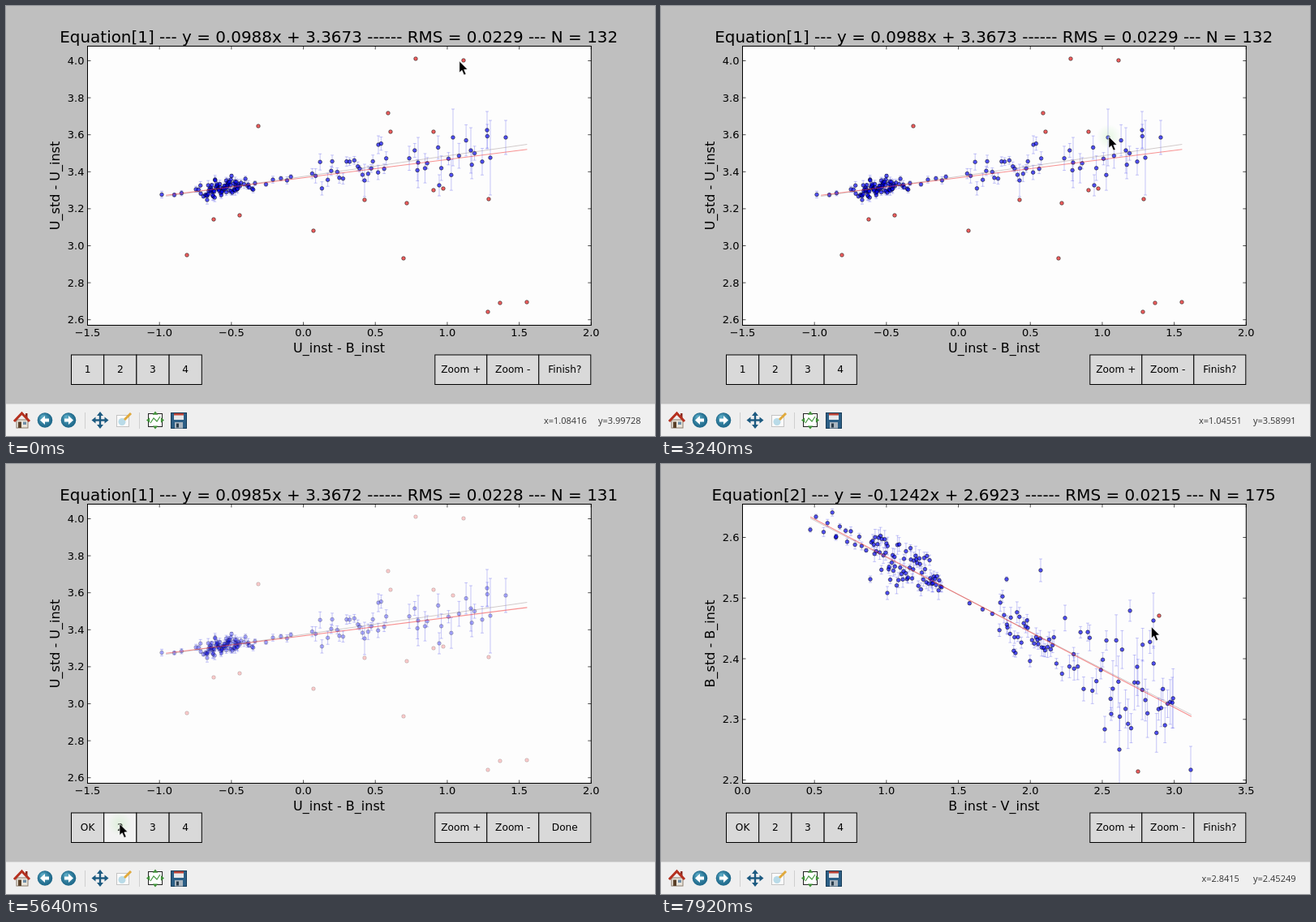
Recreate the animation shown at these times as an HTML page with a canvas. Size 800 by 530 pixels, loop 8000 ms.

```html
<!DOCTYPE html>
<html>
<head>
<meta charset="utf-8">
<style>
html, body { margin: 0; width: 100%; height: 100%; overflow: hidden; background: #bfbfbf; }
canvas { display: block; }
</style>
</head>
<body>
<canvas id="stage" width="800" height="530"></canvas>
<script>
const ctx = document.getElementById('stage').getContext('2d');
const LOOP = 8000, STEP = 120;
const SANS = '"DejaVu Sans", sans-serif';
const AXES = { left: 100.5, top: 49.5, right: 721.3, bottom: 393.5 };
const X_SCALE = (AXES.right - AXES.left) / 3.5;

let seed = 11;
const random = () => (seed = (seed * 16807) % 2147483647) / 2147483647;
// Sum of uniform numbers: a bell curve without far outliers.
const bell = () => (random() + random() + random() - 1.5) * 2;

const toStage = (plot, x, y) => [
  AXES.left + (x - plot.x0) * X_SCALE,
  plot.base.px + (plot.base.value - y) * plot.base.scale
];

// Measurements spread evenly along x and scattered around the guide line.
function scatter(plot, { count, from, to, offset = 0, spread, bar }) {
  const [x0, x1] = plot.ends.map(x => toStage(plot, x, 0)[0]);
  const [y0, y1] = plot.guide;
  return Array.from({ length: count }, (_, i) => {
    const x = from + (to - from) * (i + random()) / count;
    const y = y0 + (y1 - y0) * (x - x0) / (x1 - x0) + offset + bell() * spread;
    return [x, y, bar * (0.5 + random())];
  });
}

// Points are [x, y, error bar half height] in stage pixels of the plot's base view.
const colourU = {
  eq: 1, names: ['U_inst - B_inst', 'U_std - U_inst'],
  x0: -1.5, yStep: 0.2, ends: [-0.955, 1.555], guide: [234.5, 170.5],
  base: { value: 4, px: 67.5, scale: 228 },
  good: [[593, 153, 23], [616, 162, 21], [597, 187, 46], [508, 193, 31], [573, 178, 28],
    [459, 171, 11], [442, 215, 20], [534, 221, 13]],
  bad: [
    [505, 65], [311, 148], [471, 132], [474, 155], [527, 155], [442, 239], [494, 243], [527, 227],
    [539, 225], [595, 238], [490, 311], [379, 277], [256, 263], [288, 258], [223, 307], [594, 377],
    [609, 366], [642, 365]
  ]
};
colourU.good.push(...[
  { count: 4, from: 192, to: 236, spread: 2, bar: 3 },
  { count: 34, from: 236, to: 306, spread: 5, bar: 4 },
  { count: 44, from: 247, to: 287, offset: -1, spread: 5, bar: 4 },
  { count: 6, from: 306, to: 360, spread: 1.5, bar: 3 },
  { count: 23, from: 376, to: 472, offset: -2, spread: 12, bar: 7 },
  { count: 15, from: 490, to: 598, spread: 13, bar: 13 }
].flatMap(group => scatter(colourU, group)));
const topPoint = [564, 67, 43], nearPoint = [551, 162, 35];

const colourB = {
  eq: 2, names: ['B_inst - V_inst', 'B_std - B_inst'],
  x0: 0, yStep: 0.1, ends: [0.471, 3.12], guide: [67, 309],
  base: { value: 2.6, px: 90.5, scale: 747.5 },
  good: [[184, 81, 3], [191, 65, 3], [258, 142, 4], [279, 159, 8], [426, 142, 3], [437, 233, 5],
    [468, 131, 14], [607, 193, 34], [565, 352, 43], [547, 327, 16], [653, 377, 29]],
  bad: [[614, 187], [588, 379], [610, 409], [223, 570]]
};
const wideB = { value: 2.6, px: 81, scale: 461.7 };
colourB.good.push(...[
  { count: 14, from: 198, to: 260, offset: -2, spread: 9, bar: 4 },
  { count: 70, from: 260, to: 346, offset: -1, spread: 13, bar: 8 },
  { count: 3, from: 375, to: 415, offset: 4, spread: 2, bar: 3 },
  { count: 34, from: 416, to: 488, offset: 4, spread: 13, bar: 9 },
  { count: 17, from: 494, to: 558, offset: 6, spread: 26, bar: 11 },
  { count: 27, from: 556, to: 634, offset: 12, spread: 46, bar: 25 }
].flatMap(group => scatter(colourB, group)));

const FIT_132 = ['0.0988x + 3.3673', '0.0229', 132];
const FIT_133 = ['0.1022x + 3.3689', '0.0250', 133];
const FIT_131 = ['0.0985x + 3.3672', '0.0228', 131];
const FIT_B = ['-0.1242x + 2.6923', '0.0215', 175];

const CLICKS = [840, 1560, 3240, 4320, 5640, 6600];
// Each move is [start, end, x, y]; the pointer rests in between.
const MOVES = [
  [0, 0, ...toStage(colourU, 1.08416, 3.99728)],
  [120, 360, ...toStage(colourU, 1.10434, 4.00118)],
  [1920, 2400, ...toStage(colourU, 1.06902, 3.66579)],
  [2400, 2880, 552, 161],
  [3480, 3960, 659, 456.5],
  [3960, 4200, 688, 450],
  [4800, 5400, 140, 443.5],
  [6000, 6480, 568, 444.5],
  [6960, 7800, ...toStage(colourB, 2.8415, 2.45249)]
];

function cursorAt(t) {
  let [, , x, y] = MOVES[0];
  for (const [start, end, toX, toY] of MOVES.slice(1)) {
    const p = Math.max(0, Math.min(1, (t - start) / (end - start)));
    const ease = p * p * (3 - 2 * p);
    x = x * (1 - ease) + toX * ease;
    y = y * (1 - ease) + toY * ease;
  }
  return [x, y];
}

function stateAt(t) {
  if (t >= 5880) {
    return { plot: colourB, view: t < 6840 ? wideB : colourB.base, fit: FIT_B,
      good: colourB.good, bad: colourB.bad };
  }
  const added = t >= 960 && t < 1800, dropped = t >= 3360;
  return {
    plot: colourU, view: colourU.base, done: t >= 4440,
    fit: added ? FIT_133 : dropped ? FIT_131 : FIT_132,
    good: colourU.good.concat(added ? [topPoint] : [], dropped ? [] : [nearPoint]),
    bad: colourU.bad.concat(added ? [] : [topPoint], dropped ? [nearPoint] : [])
  };
}

function line(points, colour, width = 1) {
  ctx.beginPath();
  points.forEach(([x, y]) => ctx.lineTo(x, y));
  ctx.strokeStyle = colour;
  ctx.lineWidth = width;
  ctx.stroke();
}

function shape(points, fill) {
  ctx.beginPath();
  points.forEach(([x, y]) => ctx.lineTo(x, y));
  ctx.closePath();
  ctx.fillStyle = fill;
  ctx.fill();
}

function rect(x, y, w, h, fill, stroke) {
  ctx.fillStyle = fill;
  ctx.fillRect(x, y, w, h);
  if (!stroke) return;
  ctx.strokeStyle = stroke;
  ctx.lineWidth = 1;
  ctx.strokeRect(x, y, w, h);
}

function disc(x, y, radius, fill) {
  ctx.beginPath();
  ctx.arc(x, y, radius, 0, 7);
  ctx.fillStyle = fill;
  ctx.fill();
}

function text(string, x, y, size, align = 'center', family = SANS, colour = '#000') {
  ctx.font = `${size}px ${family}`;
  ctx.textAlign = align;
  ctx.fillStyle = colour;
  ctx.fillText(string, x, y);
}

function dot(x, y, colour, alpha) {
  ctx.globalAlpha = alpha;
  disc(x, y, 2.3, colour);
  ctx.strokeStyle = '#000';
  ctx.lineWidth = 0.8;
  ctx.stroke();
  ctx.globalAlpha = 1;
}

function drawData({ plot, view, fit, good, bad, done }) {
  const mapY = y => view.px + (y - plot.base.px) * view.scale / plot.base.scale;
  const [slope, offset] = fit[0].split('x + ').map(Number);
  const ends = plot.ends.map(x => toStage(plot, x, slope * x + offset));
  ctx.save();
  ctx.beginPath();
  ctx.rect(AXES.left, AXES.top, AXES.right - AXES.left, AXES.bottom - AXES.top);
  ctx.clip();
  for (const [x, y, error] of good) {
    const low = mapY(y + error), high = mapY(y - error), colour = 'rgba(0,0,225,.22)';
    line([[x, low], [x, high]], colour);
    line([[x - 2, low], [x + 2, low]], colour);
    line([[x - 2, high], [x + 2, high]], colour);
  }
  bad.forEach(([x, y]) => dot(x, mapY(y), '#e80000', done ? 0.2 : 0.62));
  good.forEach(([x, y]) => dot(x, mapY(y), '#00f', done ? 0.3 : 0.65));
  line(ends.map(([x], i) => [x, mapY(plot.guide[i])]), 'rgba(128,110,110,.35)');
  line(ends.map(([x, y]) => [x, mapY(y)]), 'rgba(240,30,30,.48)', 1.2);
  ctx.restore();
}

function drawAxes({ plot, view, fit }) {
  const { left, top, right, bottom } = AXES;
  const label = v => v.toFixed(1).replace('-', '\u2212');
  ctx.strokeStyle = '#000';
  ctx.lineWidth = 1;
  ctx.strokeRect(left, top, right - left, bottom - top);
  for (let i = 0; i <= 7; i++) {
    const x = left + i * X_SCALE / 2;
    line([[x, bottom], [x, bottom - 4]], '#000', 0.7);
    line([[x, top], [x, top + 4]], '#000', 0.7);
    text(label(plot.x0 + i / 2), x, 407, 13);
  }
  for (let value = view.value; ; value -= plot.yStep) {
    const y = view.px + (view.value - value) * view.scale;
    if (y > bottom) break;
    line([[left, y], [left + 4, y]], '#000', 0.7);
    line([[right, y], [right - 4, y]], '#000', 0.7);
    text(label(value), 96.5, y + 4.5, 13, 'right');
  }
  text(`Equation[${plot.eq}] --- y = ${fit[0]} ------ RMS = ${fit[1]} --- N = ${fit[2]}`, 410.2, 45, 19.95);
  text(plot.names[0], 410.5, 427, 16);
  ctx.save();
  ctx.translate(66, 221.5);
  ctx.rotate(-Math.PI / 2);
  text(plot.names[1], 0, 0, 16);
  ctx.restore();
}

function drawButtons(t, done) {
  const [mx, my] = cursorAt(Math.max(0, t - STEP));
  const row = (left, width, labels) => labels.forEach((label, i) => {
    const x = left + i * width;
    const hover = mx > x && mx < x + width && my > 430 && my < 466;
    rect(x, 430, width, 36.5, hover ? '#f2f2f2' : '#d9d9d9', '#000');
    text(label, x + width / 2, 451.5, 12.2);
  });
  row(80.5, 40.2, [t >= 4920 ? 'OK' : '1', '2', '3', '4']);
  row(528.8, 64, ['Zoom +', 'Zoom -', done ? 'Done' : 'Finish?']);
}

function roundArrow(x, direction) {
  const ball = ctx.createRadialGradient(x - 3, 506, 1, x, 511, 10);
  ball.addColorStop(0, '#5aa9c4');
  ball.addColorStop(1, '#155f82');
  disc(x, 510.5, 9.3, ball);
  const tip = x + direction * 6;
  shape([[tip, 510.5], [x, 505], [x, 516]], '#fff');
  line([[x, 510.5], [x - direction * 5, 510.5]], '#fff', 4);
}

function fourArrows(x, y, radius, size, colour) {
  for (let i = 0; i < 4; i++) {
    ctx.save();
    ctx.translate(x, y);
    ctx.rotate(i * Math.PI / 2);
    shape([[0, -radius], [-size, size * 1.25 - radius], [size, size * 1.25 - radius]], colour);
    ctx.restore();
  }
}

function drawToolbar({ plot, view }, x, y) {
  rect(0, 490.5, 800, 40, '#efefef');
  for (const divider of [97.5, 164.5]) line([[divider, 501], [divider, 521]], '#cfcfcf');

  rect(13, 510, 14, 10, '#e9e4da', '#8a7a6a');
  rect(24, 502, 2.5, 6, '#8b2a1c');
  line([[10, 512], [19.5, 502], [29, 512]], '#b5301f', 3);
  rect(15, 512.5, 4, 7.5, '#5a4028');
  rect(21, 512.5, 4, 3.5, '#6f8fa8');

  roundArrow(48, -1);
  roundArrow(77, 1);

  line([[108, 510.5], [124, 510.5]], '#1c5a80', 2.4);
  line([[116, 502], [116, 519]], '#1c5a80', 2.4);
  fourArrows(116, 510.5, 10.5, 4, '#1c5a80');

  rect(136.5, 504.5, 15, 14, '#fafafa', '#c4c4c4');
  disc(143, 512.5, 4.5, '#b9dbe8');
  line([[146, 510], [154, 502]], '#e0a93c', 3);

  rect(175.5, 502.5, 17, 16, '#fff', '#222');
  line([[178, 514], [182, 508], [186, 512], [190, 506]], '#4a9a45', 1.2);
  fourArrows(184, 510.5, 11, 3.3, '#3f9138');

  rect(203.5, 501.5, 19, 19, '#2c5f86', '#173c58');
  rect(207, 502, 12, 8, '#e6e9ec');
  rect(207, 502, 12, 2.5, '#b94134');
  rect(208, 513, 10, 7.5, '#aab6c0');
  rect(210, 514.5, 3, 5, '#2a3d4c');

  const { left, top, right, bottom } = AXES;
  if (x < left || x > right || y < top || y > bottom) return;
  const show = v => Number(v.toPrecision(6));
  const dataX = show(plot.x0 + (x - left) / X_SCALE);
  const dataY = show(view.value - (y - view.px) / view.scale);
  text(`x=${dataX}`.padEnd(14) + `y=${dataY}`, 782.5, 514.5, 11, 'right', '"Open Sans", "Noto Sans", sans-serif', '#333');
}

function drawCursor(t, x, y) {
  const click = CLICKS.find(c => t >= c && t < c + 660);
  if (click !== undefined) {
    const glow = ctx.createRadialGradient(x, y, 4, x, y, 15);
    glow.addColorStop(0, '#a6e69a');
    glow.addColorStop(1, 'rgba(166,230,154,0)');
    ctx.globalAlpha = 0.75 * Math.sin(Math.PI * (t - click + 60) / 720);
    disc(x, y, 15, glow);
    ctx.globalAlpha = 1;
  }
  ctx.save();
  ctx.translate(x, y);
  shape([[0, 0], [0, 14], [3.2, 11.2], [5.7, 17], [8.2, 16], [5.8, 10.4], [10, 10]], '#000');
  ctx.strokeStyle = 'rgba(255,255,255,.8)';
  ctx.lineWidth = 0.8;
  ctx.stroke();
  ctx.restore();
}

function draw(now) {
  const t = Math.floor((now % LOOP) / STEP) * STEP;
  const state = stateAt(t), [x, y] = cursorAt(t);
  rect(0, 0, 800, 530, '#bfbfbf');
  rect(AXES.left, AXES.top, AXES.right - AXES.left, AXES.bottom - AXES.top, '#fdfdfd');
  drawData(state);
  drawAxes(state);
  drawButtons(t, state.done);
  drawToolbar(state, x, y);
  drawCursor(t, x, y);
  requestAnimationFrame(draw);
}
requestAnimationFrame(draw);
</script>
</body>
</html>
```
